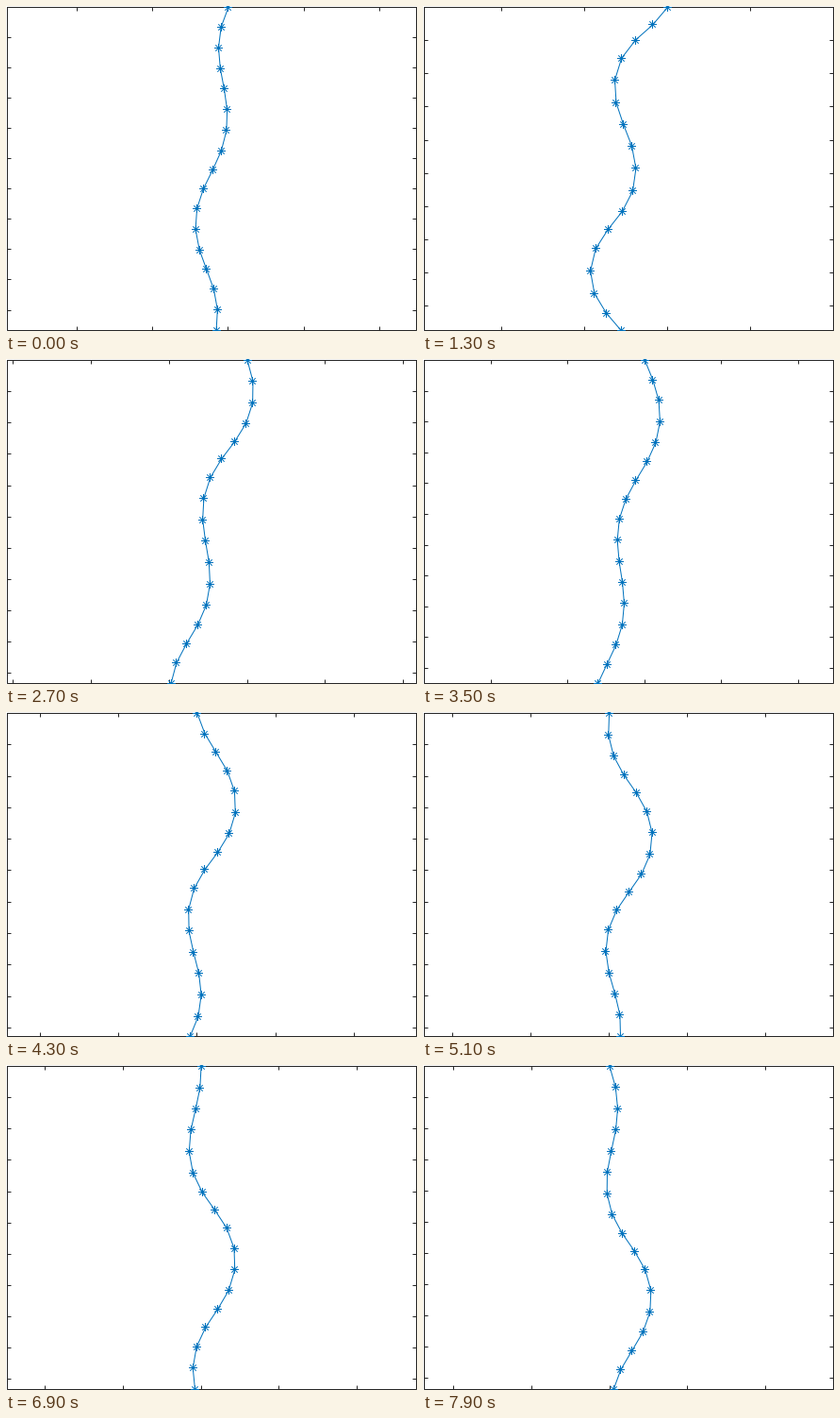
Write a matplotlib script that moves like this. It is 436 by 344 pixels and loops after 8000 ms.

```python
import numpy as np
import matplotlib.pyplot as plt
from matplotlib.animation import FuncAnimation

W, H, DPI = 436, 344, 100
PX = 72 / DPI                       # points per pixel
LEFT, RIGHT, TOP, BOTTOM = 1.5, 435.5, 1.5, 343.5
LINKS, LINK = np.arange(16), 0.138  # link numbers, link length in axis units
X_STEP, Y_STEP, TICK = 0.5, 0.2, 4
INK, BLUE = "#262626", "#0072BD"

# Crests and troughs of the bending wave: place along the body, lean.
CREST_AT = [-16.2, -11.8, -7.1, -1.7, 3.1, 7.6, 12.4, 16.6]
CREST = np.array([35, -26, 60, -60, 30, -50, 52, -30]) / 100

# Key moments: how far the wave has run, its strength, the body's tilt.
KEY_STEP = [0, 5, 9, 16, 20, 28, 38]
TRAVEL = [0.1, 2.6, 4.7, 6.9, 8.6, 11.7, 15.2]
GAIN = [0.8, 1.25, 0.95, 0.75, 0.95, 1.0, 0.92]
TILT = [-0.05, 0, -0.1, -0.07, -0.03, 0.01, 0.02]

# Arms of the star marker, as half-lengths in pixels.
ARMS = [(4.5, 0), (0, 4.5), (3.2, 3.2), (3.2, -3.2)]


def wave(pos):
    """Cosine easing from crest to trough."""
    i = np.clip(np.searchsorted(CREST_AT, pos) - 1, 0, len(CREST) - 2)
    start, end = np.take(CREST_AT, i), np.take(CREST_AT, i + 1)
    ease = (1 - np.cos(np.pi * (pos - start) / (end - start))) / 2
    return CREST[i] + (CREST[i + 1] - CREST[i]) * ease


def chain(step):
    """Joint positions in pixels and the scale that fits them to the box."""
    travel, gain, tilt = (np.interp(step, KEY_STEP, v)
                          for v in (TRAVEL, GAIN, TILT))
    lean = gain * wave(LINKS - travel) + tilt
    x = np.concatenate([[0], np.cumsum(lean)]) * LINK
    y = np.concatenate([[0], np.cumsum(np.sqrt(1 - lean**2))]) * LINK
    scale = (BOTTOM - TOP) / y[-1]
    mid = (LEFT + RIGHT) / 2
    return mid + (x - (x.min() + x.max()) / 2) * scale, TOP + y * scale, scale


def pixel(v):
    return np.floor(v) + 0.5


def tick_spots(zero, gap, low, high):
    n = np.arange(np.ceil((low - zero) / gap), np.floor((high - zero) / gap) + 1)
    return pixel(zero + n * gap)


def tick_path(x0, y0, scale):
    xs, ys = [], []
    for x in tick_spots(x0, X_STEP * scale, LEFT, RIGHT):
        xs += [x, x, np.nan] * 2
        ys += [TOP, TOP + TICK, np.nan, BOTTOM, BOTTOM - TICK, np.nan]
    for y in tick_spots(y0, Y_STEP * scale, TOP, BOTTOM):
        xs += [LEFT, LEFT + TICK, np.nan, RIGHT, RIGHT - TICK, np.nan]
        ys += [y, y, np.nan] * 2
    return xs, ys


def star_path(xs, ys):
    px, py = [], []
    for x, y in zip(pixel(xs), pixel(ys)):
        for dx, dy in ARMS:
            px += [x - dx, x + dx, np.nan]
            py += [y - dy, y + dy, np.nan]
    return px, py


fig = plt.figure(figsize=(W / DPI, H / DPI), dpi=DPI, facecolor="white")
ax = fig.add_axes([0, 0, 1, 1])
ax.set_xlim(0, W)
ax.set_ylim(H, 0)
ax.axis("off")


def stroke(color, x=(), y=()):
    line, = ax.plot(x, y, color=color, lw=PX, snap=False,
                    solid_capstyle="butt", solid_joinstyle="miter")
    return line


stroke(INK, [LEFT, RIGHT, RIGHT, LEFT, LEFT, RIGHT],
       [TOP, TOP, BOTTOM, BOTTOM, TOP, TOP])
ticks, body, stars = stroke(INK), stroke(BLUE), stroke(BLUE)


def draw(frame):
    step = 0 if frame < 5 else (frame - 5) // 2 + 1
    x, y, scale = chain(step)
    body.set_data(x, y)
    stars.set_data(*star_path(x, y))
    ticks.set_data(*tick_path(x[0], y[0], scale))
    return ticks, body, stars


anim = FuncAnimation(fig, draw, frames=80, interval=100, repeat=True,
                     repeat_delay=0, blit=False)
plt.show()
```
